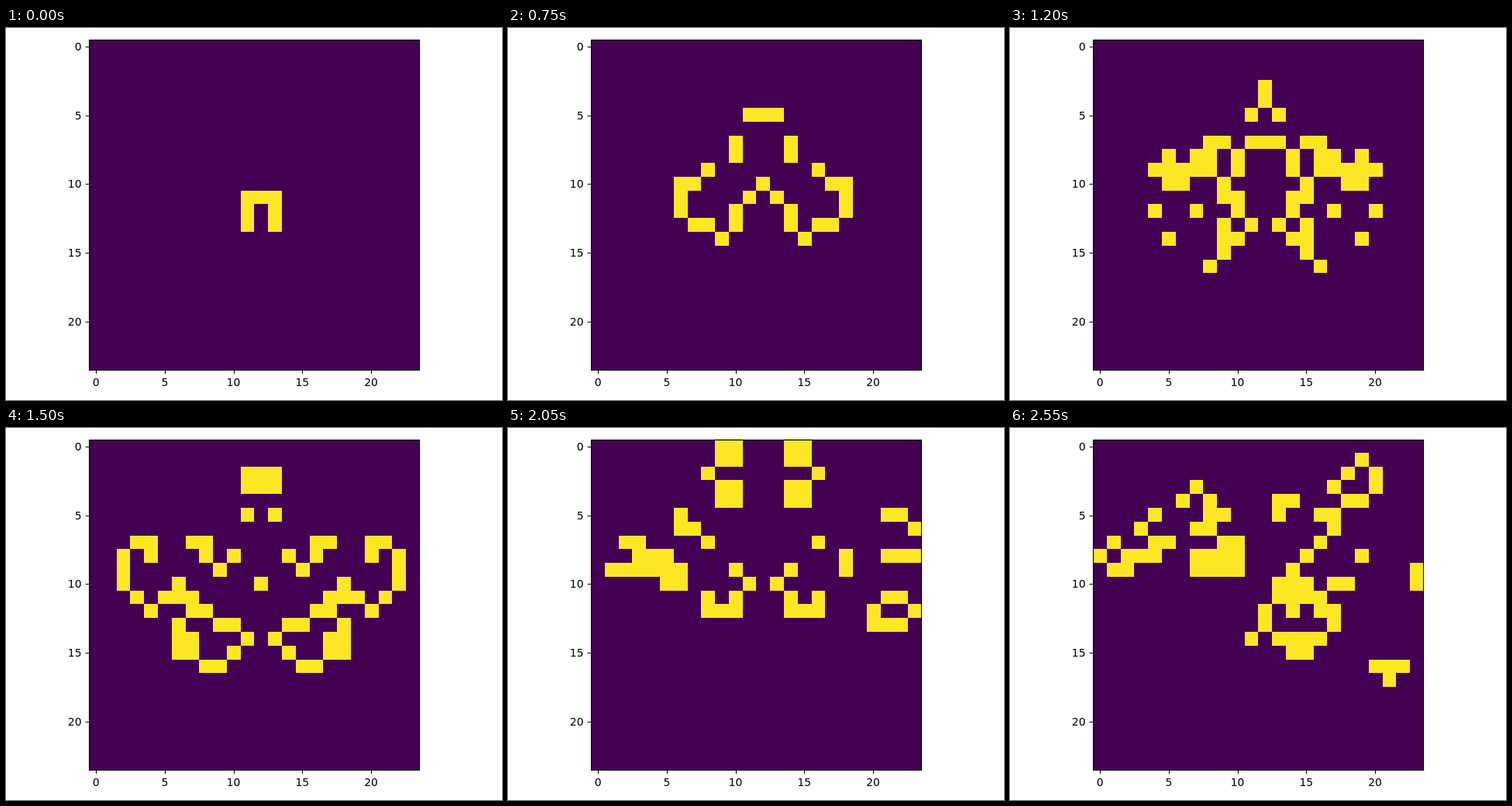
Animation, 640 px wide and 480 px high, one loop 2600 ms. Source, as an HTML page with a canvas:

```html
<!DOCTYPE html>
<html lang="en">
<head>
<meta charset="utf-8">
<title>Game of Life</title>
<style>
  html, body { margin: 0; width: 100%; height: 100%; overflow: hidden; background: #fff; }
  canvas { display: block; }
</style>
</head>
<body>
<canvas id="stage" width="640" height="480"></canvas>
<script>
const ctx = document.getElementById('stage').getContext('2d');
const SIZE = 24;
const STEP = 50;
const LOOP = 2600;
const LAST = LOOP / STEP - 2;   // the first generation stays for two steps
const DARK = '#440154';
const LIGHT = '#fde725';
const box = { left: 107, top: 15, right: 533, bottom: 441 };

const alive = (grid, x, y) => (grid[y] && grid[y][x]) || 0;

// Cells beyond the border count as dead.
function nextGeneration(grid) {
  return grid.map((row, y) => row.map((cell, x) => {
    let count = -cell;
    for (let dy = -1; dy <= 1; dy++)
      for (let dx = -1; dx <= 1; dx++) count += alive(grid, x + dx, y + dy);
    return count === 3 || (cell && count === 2) ? 1 : 0;
  }));
}

const seed = Array.from({ length: SIZE }, () => Array(SIZE).fill(0));
['###', '#.#', '#.#'].forEach((line, dy) =>
  [...line].forEach((mark, dx) => { seed[11 + dy][11 + dx] = mark === '#' ? 1 : 0; }));

const generations = [seed];
while (generations.length <= LAST) generations.push(nextGeneration(generations.at(-1)));

// Whole-pixel cell edges, halves rounded down.
const edge = (start, i) => Math.ceil(start + i * 427 / SIZE - 0.5);
const edgeX = i => edge(107, i);
const edgeY = i => edge(14, i);

function drawCells(grid) {
  ctx.fillStyle = DARK;
  ctx.fillRect(box.left, box.top, box.right - box.left, box.bottom - box.top);
  ctx.fillStyle = LIGHT;
  grid.forEach((row, y) => row.forEach((cell, x) => {
    if (cell) ctx.fillRect(edgeX(x), edgeY(y), edgeX(x + 1) - edgeX(x), edgeY(y + 1) - edgeY(y));
  }));
}

function drawAxes() {
  ctx.strokeStyle = ctx.fillStyle = '#000';
  ctx.lineWidth = 1.11;
  ctx.strokeRect(box.left + 0.5, box.top + 0.5, box.right - box.left, box.bottom - box.top);
  ctx.font = '13.89px "DejaVu Sans", sans-serif';
  for (let value = 0; value <= 20; value += 5) {
    const x = 116.1 + value * 17.75;
    const y = 23.8 + value * 17.75;
    const tickX = Math.round(x) + 0.5;
    const tickY = Math.round(y) + 0.5;
    ctx.beginPath();
    ctx.moveTo(tickX, box.bottom + 0.5);
    ctx.lineTo(tickX, box.bottom + 5.36);
    ctx.moveTo(box.left + 0.5, tickY);
    ctx.lineTo(box.left - 4.36, tickY);
    ctx.stroke();
    ctx.textAlign = 'center';
    ctx.fillText(value, x, 462);
    ctx.textAlign = 'right';
    ctx.fillText(value, 97.5, Math.round(y + 5.1));
  }
}

function draw(time) {
  const index = Math.max(0, Math.floor((time % LOOP) / STEP) - 1);
  ctx.fillStyle = '#fff';
  ctx.fillRect(0, 0, 640, 480);
  drawCells(generations[index]);
  drawAxes();
}

const start = performance.now();
function tick() {
  draw(performance.now() - start);
  requestAnimationFrame(tick);
}
tick();
</script>
</body>
</html>
```
